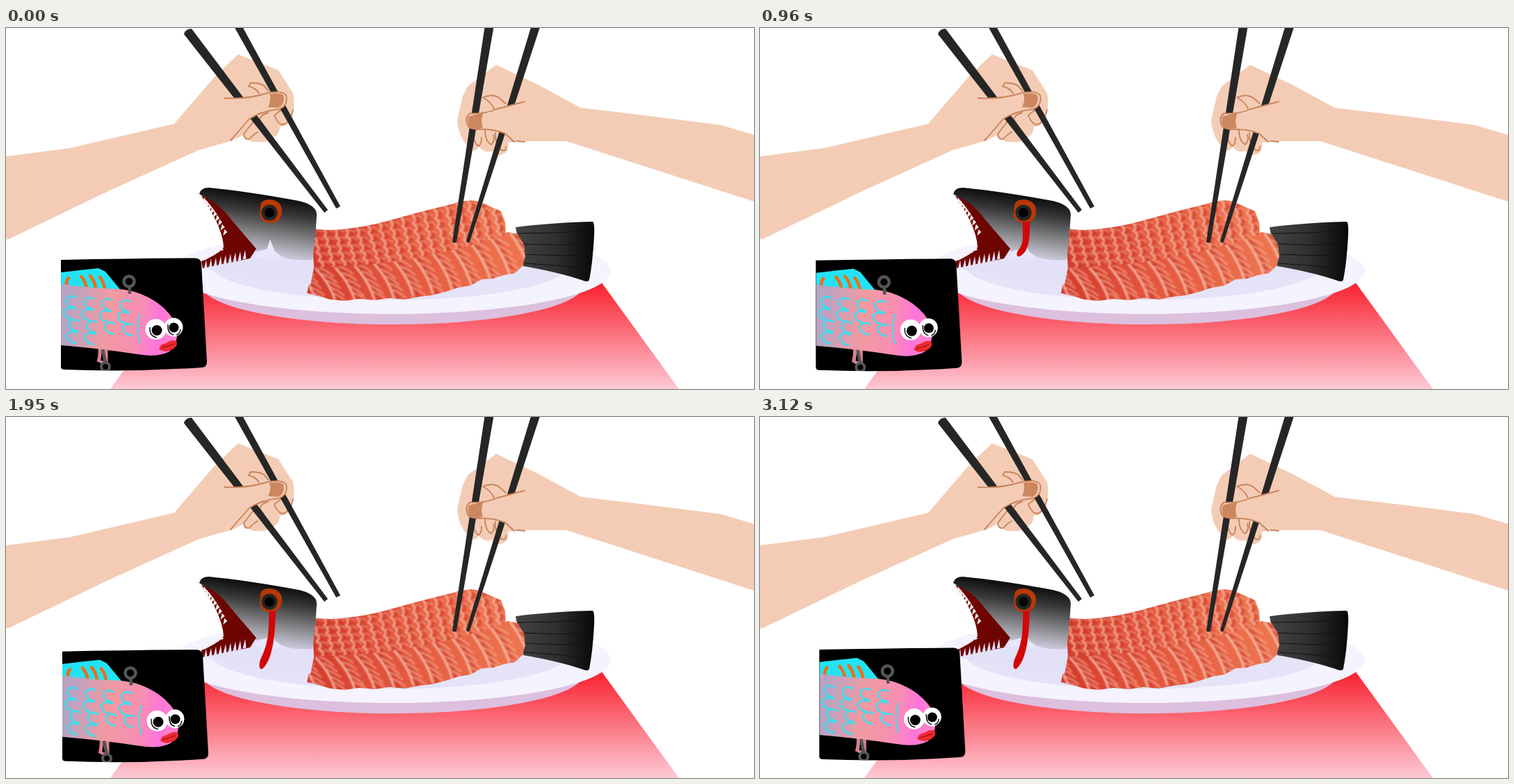
Recreate the animation shown at these times as an HTML page. Size 1076x520 px, loop 3.15 s.

```html
<!DOCTYPE html>
<html lang="en">
<head>
<meta charset="utf-8">
<title>Dinner</title>
<style>
html, body { margin: 0; width: 100%; height: 100%; overflow: hidden; background: #fff; }
svg { display: block; width: 100%; height: 100%; }
.line { fill: none; stroke: #c9845b; stroke-width: 1.9; stroke-linecap: round; stroke-linejoin: round; }
.skin { fill: #f4ccb5; }
.nail { fill: #cc875f; }
.stick { fill: #262626; }
</style>
</head>
<body>
<svg viewBox="0 0 1076 520">
  <defs>
    <linearGradient id="cloth" x1="0" y1="368" x2="0" y2="520" gradientUnits="userSpaceOnUse">
      <stop stop-color="#f9222f"/><stop offset="1" stop-color="#fdc9d5"/>
    </linearGradient>
    <linearGradient id="skull" x1="372" y1="236" x2="358" y2="334" gradientUnits="userSpaceOnUse">
      <stop stop-color="#050505"/><stop offset=".3" stop-color="#3a3a3a"/>
      <stop offset=".65" stop-color="#8e8e92"/><stop offset="1" stop-color="#e0def4"/>
    </linearGradient>
    <linearGradient id="tail"><stop stop-color="#444"/><stop offset=".5" stop-color="#303030"/><stop offset="1" stop-color="#080808"/></linearGradient>
    <linearGradient id="meat"><stop stop-color="#d33a2b"/><stop offset=".4" stop-color="#e3553d"/><stop offset="1" stop-color="#ee7650"/></linearGradient>
    <linearGradient id="lure" x1="85" y1="430" x2="232" y2="450" gradientUnits="userSpaceOnUse">
      <stop stop-color="#b8a3c2"/><stop offset=".4" stop-color="#f29aa2"/>
      <stop offset=".7" stop-color="#f78fb2"/><stop offset=".9" stop-color="#ff74dc"/><stop offset="1" stop-color="#fb80cc"/>
    </linearGradient>
    <filter id="soft"><feGaussianBlur stdDeviation=".8"/></filter>
    <path id="upperShape" d="M440 289Q468 293 492 289Q520 286 545 279L600 264L640 254Q663 247 676 249L692 255L712 264L718 280L719 297Q690 307 650 318Q600 330 545 338Q490 344 440 345Z"/>
    <path id="lowerShape" d="M440 345Q500 339 550 337Q620 325 668 311Q705 300 722 294L736 297L745 312L747 328L743 343L732 353L716 356L700 361L684 362L668 371L650 374L632 380L612 385L594 387L574 391L552 389L530 392L508 390L488 393L466 391L450 386L433 382Z"/>
    <clipPath id="upperClip"><use href="#upperShape"/></clipPath>
    <clipPath id="lowerClip"><use href="#lowerShape"/></clipPath>
    <path id="boxShape" d="M79 334Q180 332 272 331.5Q280 331.500 281 339L289 480Q289.500 488 282 489Q180 496 84 492Q79 492 79 488Z"/>
    <clipPath id="boxClip"><use href="#boxShape"/></clipPath>
  </defs>

  <path fill="url(#cloth)" d="M261 367H857L968 520H150Z"/>

  <ellipse cx="556" cy="370" rx="275" ry="57" fill="#dcc0de"/>
  <ellipse cx="555" cy="350" rx="315" ry="62" fill="#f5f3ff"/>
  <ellipse cx="552" cy="341" rx="258" ry="51" fill="#e5e3f8"/>

  <path fill="url(#tail)" d="M733 287Q790 280 844 279Q847 281 846 300Q844 338 839 363Q837 367 828 363Q795 352 744 343Z"/>
  <path fill="none" stroke="#111" d="M736 296Q790 296 840 292M742 311Q790 314 839 311M746 326Q790 328 838 328M746 339Q790 341 836 347"/>

  <use href="#lowerShape" fill="url(#meat)"/>
  <g clip-path="url(#lowerClip)"><g id="lower" fill="none" stroke-linecap="round" filter="url(#soft)"></g></g>
  <use href="#upperShape" fill="url(#meat)"/>
  <g clip-path="url(#upperClip)"><g id="upper" fill="none" stroke-linejoin="round" stroke-linecap="round" filter="url(#soft)"></g></g>

  <path fill="#e3e1f8" d="M350 331L362 318L440 300L443 345L438 370L360 362L288 347Z"/>
  <path fill="url(#skull)" d="M278 239Q280 230 292 230Q345 235 421 249Q447 255 447 269Q445 306 441 334Q402 337 386 322L380 305L376 318L361 322L318 274L284 243Z"/>
  <path fill="#e9e7fb" d="M358 330L362 322L375 319L380 305L387 322L396 329L390 334Z"/>
  <path fill="#6e0500" d="M281 242Q304 249 324 276L360 318L351 332L283 346L281 336Q302 328 313 316Q312 287 281 242Z"/>
  <g id="teeth" fill="#f6eeee"></g>
  <path fill="#b83806" d="M366 256Q367 247 380 247Q397 249 397 264Q396 279 383 281Q367 282 365 268Z"/>
  <circle cx="379" cy="266" r="11.500" fill="#252525"/>
  <circle cx="379" cy="266" r="7" fill="#000"/>
  <path id="tear" fill="#d20808"/>

  <g>
    <path class="skin" d="M0 185L92 173L242 138Q270 105 303 67L334 38L392 61L413 94Q417 114 409 132Q404 143 394 142Q393 157 381 158Q376 166 365 164Q354 166 349 160Q340 162 342 154L326 162L277 176L145 236L2 305L0 302Z"/>
    <path class="line" d="M349 84L352 79Q365 79 371 83L378 91M349 84Q359 86 364 94M396 118Q389 123 386 126Q391 138 397 139Q408 139 413 118M377 122Q366 125 365 132Q375 145 380 156M359 131Q349 143 342 153Q343 161 350 160Q356 153 362 150"/>
    <path class="stick" d="M256 9Q258 1 267 1L463 262L458 266Z"/>
    <path class="stick" d="M327 -4L339 -4L481 257L475 260Z"/>
    <path class="skin" d="M314 101Q347 103 375 94Q397 89 403 97Q406 112 393 117Q369 119 350 131Q338 145 323 162L300 140Z"/>
    <path class="line" d="M314 101Q347 103 375 94Q397 89 403 97Q406 112 393 117Q369 119 350 131Q338 145 323 162"/>
    <path class="nail" d="M379 95Q394 92 399 97Q402 109 392 115L377 114Q382 104 379 95Z"/>
  </g>

  <g>
    <path class="skin" d="M1076 154L1029 140L920 126L827 115L766 82L705 53L664 84L657 98L649 133Q651 157 665 171Q673 182 680 171Q689 181 698 177Q708 188 719 179Q724 173 722 165L747 163L806 163L1076 250Z"/>
    <path class="line" d="M686 100Q700 94 710 101L719 109M686 100Q697 106 702 116M672 148Q672 164 679 170Q684 169 684 158M689 146Q689 163 698 168Q704 162 701 154M704 151Q703 167 713 176Q720 178 719 171M728 162L746 164"/>
    <path class="stick" d="M689 -4H702L648 308Q645 311 642 308Z"/>
    <path class="stick" d="M756 -4H769L667 308Q664 311 662 307Z"/>
    <path class="skin" d="M746 106Q724 112 705 117Q690 124 667 123Q659 130 665 142Q671 147 687 146Q703 146 718 152L731 164L757 150Z"/>
    <path class="line" d="M746 106Q724 112 705 117Q690 124 667 123Q659 130 665 142Q671 147 687 146Q703 146 718 152L731 164"/>
    <path class="nail" d="M666 127L687 122Q682 132 686 144Q670 148 666 141Q663 134 666 127Z"/>
  </g>

  <g id="box">
    <use href="#boxShape"/>
    <g clip-path="url(#boxClip)">
      <path fill="#22e3f5" d="M79 352Q112 348 133 346L143 351L167 380L79 372Z"/>
      <path fill="none" stroke="#f16b12" stroke-width="4.500" stroke-linecap="round" d="M87 371Q86 364 90 360M116 375Q114 364 108 358M129 375Q128 365 121 357M142 376Q141 366 135 359"/>
      <path fill="none" stroke="#d98093" stroke-width="5" d="M135 458Q136 470 133 481M144 460L144 481"/>
      <path fill="none" stroke="#d98093" stroke-width="4" d="M133 478Q139 485 145 478"/>
      <path fill="url(#lure)" d="M79 369Q126 375 160 376Q190 377 218 396Q237 410 245 428Q250 452 235 466Q218 475 190 470Q130 461 79 457Z"/>
      <path fill="none" stroke="#555" stroke-width="4.500" d="M177.500 373L178 383M139 463L143 482"/>
      <circle cx="177" cy="365" r="7.500" fill="none" stroke="#555" stroke-width="4.500"/>
      <circle cx="143" cy="488" r="6" fill="none" stroke="#555" stroke-width="4"/>
      <g id="scales" fill="none" stroke="#35dff0" stroke-width="2.300" stroke-linecap="round"></g>
      <path fill="none" stroke="#35dff0" stroke-width="2" d="M193 411Q186 434 193 454"/>
      <circle cx="215.500" cy="434" r="15" fill="#fff"/>
      <circle cx="241" cy="431" r="13.500" fill="#fff"/>
      <circle cx="217" cy="435.500" r="7.500"/>
      <circle cx="241.500" cy="431.500" r="7"/>
      <path fill="none" stroke="#111" stroke-width="1.500" d="M207 431Q206 444 217 446M233 427Q232 440 241 442M251 434Q250 441 245 442"/>
      <path fill="#ee2a30" d="M220 463Q221 455 230 454Q239 448 245 451Q248 457 241 462Q230 469 220 463Z"/>
      <path fill="none" stroke="#a91620" stroke-width="1.500" d="M224 461Q232 459 242 455"/>
    </g>
  </g>
</svg>
<script>
const $ = id => document.getElementById(id);
const LOOP = 3150, STEP = 30;

let seed = 7;
const rnd = () => (seed = seed * 16807 % 2147483647) / 2147483647;
const stroke = (d, color, width, opacity = 1) =>
  `<path d="${d}" stroke="${color}" stroke-width="${width}" opacity="${opacity}"/>`;

// Upright slices with wavy pale edges.
function drawUpper() {
  let out = '';
  for (let x = 437; x < 735; x += 16) {
    const top = x < 500 ? 289 : 289 - (x - 500) * .245;
    const bottom = 346 - Math.pow(Math.max(0, x - 440) / 280, 1.7) * 48;
    const n = 5, dy = (bottom - top) / n;
    let edge = `M${x} ${top - 4}`;
    for (let k = 1; k <= n; k++)
      edge += `Q${x + k * 3 + 8} ${top + dy * (k - .5)} ${x + k * 3 + rnd() * 2} ${top + dy * k}`;
    out += `<g transform="translate(5 0)">${stroke(edge, '#cf3523', 5, .55)}</g>`;
    out += stroke(edge, '#f9bfa8', 2.8, .75);
    for (let k = 0; k < n; k++)
      out += stroke(`M${x + k * 3 + 4} ${top + dy * (k + .3)}q7 ${-2 - rnd() * 4} 13 1`, '#f5a78e', 2.2, .55);
  }
  $('upper').innerHTML = out;
}

// Overlapping feathered slices with diagonal fat lines.
function drawLower() {
  let out = '';
  for (let x = 418; x < 755; x += 28) {
    const u = Math.max(0, x - 440) / 300;
    const top = 347 - Math.pow(u, 1.7) * 55, bottom = 394 - Math.pow(u, 1.8) * 43;
    const h = bottom - top;
    const edge = `M${x} ${top}Q${x + 20} ${top + h * .45} ${x + 28} ${bottom}`;
    out += `<g transform="translate(6 0)">${stroke(edge, '#c93222', 6, .5)}</g>`;
    out += stroke(edge, '#fbcab6', 3, .8);
    for (let k = 0; k < 5; k++) {
      const y = top + h * (k - .2) / 5, px = x + 5 + k * 5;
      out += stroke(`M${px} ${y}q11 ${2 + rnd() * 3} 20 ${10 + rnd() * 3}`, '#f8b09a', 2.4, .65);
    }
  }
  $('lower').innerHTML = out;
}

function drawTeeth() {
  let d = '', gaps = '';
  for (let i = 0; i < 9; i++) {
    const u = i / 9, x = 285 + u * 33, y = 244 + u * 54 - Math.sin(u * 3) * 5;
    d += `M${x} ${y}l-2 ${11 - u * 2}l6 -5z`;
    const gx = 287 + i * 7, gy = 347 - i * 1.8;
    gaps += `M${gx - 2.5} ${gy + 1}L${gx + 1} ${gy - 13}L${gx + 2.5} ${gy}z`;
  }
  for (let i = 0; i < 5; i++) d += `M${284 + i * 6} ${335 - i * 3.4}l2 -7l3 5z`;
  $('teeth').innerHTML = `<path d="${d}"/><path d="${gaps}" fill="#e3e1f8"/>`;
}

function drawScales() {
  let d = '';
  for (let col = 0; col < 4; col++)
    for (let row = 0; row < (col < 2 ? 4 : 3); row++) {
      const x = 101 + col * 26 - (row % 2) * 5 + row * 2;
      const y = 388 + row * 17 + col * 2;
      d += `M${x} ${y}q-10 -5 -15 3q0 10 13 12`;
    }
  $('scales').innerHTML = `<path d="${d}"/>`;
}

// Keys are [time, value, value, ...]; values ease through each key.
function sample(keys, t) {
  let i = 0;
  while (i < keys.length - 2 && t >= keys[i + 1][0]) i++;
  const a = keys[i], b = keys[i + 1];
  const p = keys[Math.max(0, i - 1)], q = keys[Math.min(keys.length - 1, i + 2)];
  const span = b[0] - a[0], u = Math.min(1, (t - a[0]) / span);
  return a.slice(1).map((v, j) => {
    const k = j + 1;
    const m0 = (b[k] - p[k]) / (b[0] - p[0]) * span;
    const m1 = (q[k] - a[k]) / (q[0] - a[0]) * span;
    const u2 = u * u, u3 = u2 * u;
    return v * (2 * u3 - 3 * u2 + 1) + m0 * (u3 - 2 * u2 + u) +
      b[k] * (3 * u2 - 2 * u3) + m1 * (u3 - u2);
  });
}

const shake = [
  [0, 0, 0], [210, 3, 3.5], [420, 4, -1], [630, 2, 2], [810, -2, 4], [1050, 3, -1],
  [1290, 0, -2], [1500, 3, 4], [1740, 5, -4.5], [1950, 2, 3.7], [2160, 6, 1],
  [2400, 4.5, 0], [2640, 1, -1.5], [2880, 3, 3], [3120, 6.3, 1], [3150, 6, 1]
];
// time, tip x, tip y, half width of the top
const drop = [
  [0, 382, 278, 3], [630, 377, 308, 5.5], [1290, 366, 350, 4.5], [1620, 366.5, 363, 4.7], [3150, 366.5, 363, 4.7]
];

function tearPath(t) {
  const [x, y, w] = sample(drop, Math.min(t, 1620));
  const top = 280, h = y - top, cx = 383;
  if (h < 1) return '';
  return `M${cx - w} ${top}L${cx + w} ${top - 1}` +
    `C${cx + w} ${top + h * .4} ${x + 17} ${y - h * .14} ${x + 2} ${y}` +
    `Q${x - 4} ${y + 1} ${x - 1} ${y - h * .15}` +
    `C${x + 9} ${y - h * .4} ${cx - w} ${top + h * .45} ${cx - w} ${top}Z`;
}

function render(now) {
  const t = Math.floor(now % LOOP / STEP) * STEP;
  const [dx, dy] = sample(shake, t);
  $('box').setAttribute('transform', `translate(${dx.toFixed(2)} ${dy.toFixed(2)})`);
  $('tear').setAttribute('d', tearPath(t));
}

drawUpper();
drawLower();
drawTeeth();
drawScales();
render(0);
let start;
requestAnimationFrame(function tick(now) {
  start ??= now;
  render(now - start);
  requestAnimationFrame(tick);
});
</script>
</body>
</html>
```
